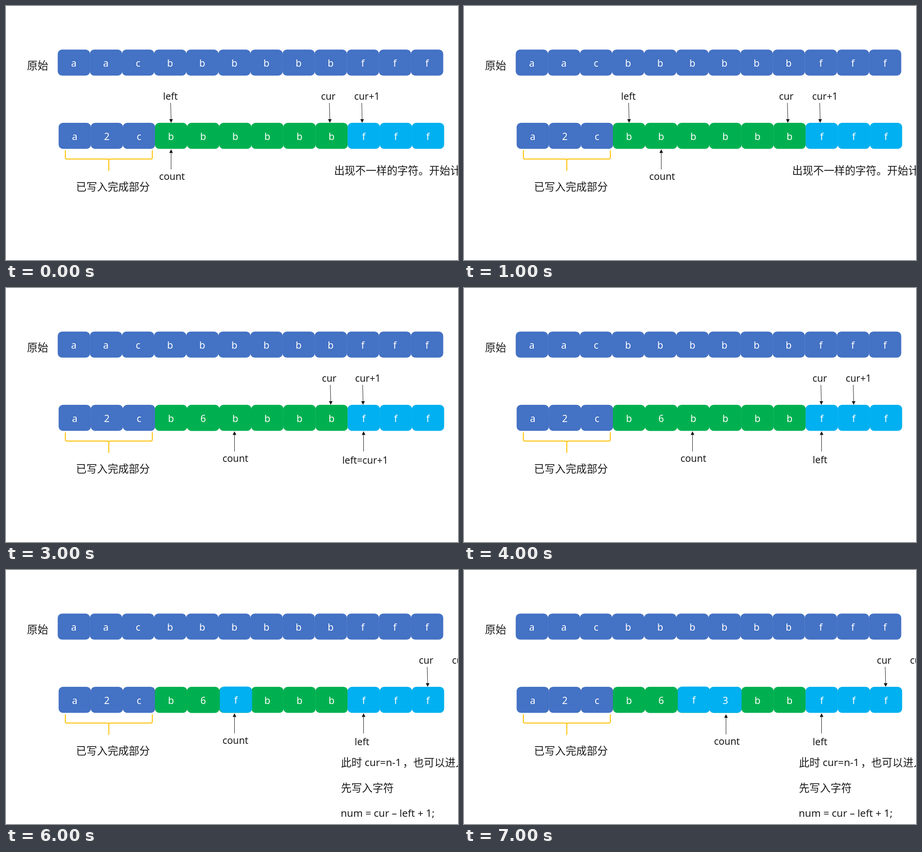
Recreate the animation shown at these times as an HTML page. Size 998 by 561 pixels, loop 8 s.

```html
<!DOCTYPE html>
<html lang="zh-CN">
<head>
<meta charset="utf-8">
<title>Run-length compression</title>
<style>
  html, body { margin: 0; width: 100%; height: 100%; overflow: hidden; background: #fff; }
  svg { display: block; width: 998px; height: 561px; }
  text { font: 21.3px "Noto Sans", "Noto Sans CJK SC", "Noto Sans CJK", sans-serif; fill: #1a1a1a; }
  .mid, .cell text { text-anchor: middle; }
  .zh { font: 23.3px "Noto Sans CJK SC", "Noto Sans CJK", sans-serif; }
  .note { font-size: 22.4px; }
  .cell text { fill: #fff; }
  .blue { fill: #4472c4; }
  .green { fill: #00b050; }
  .cyan { fill: #00b0f0; }
  .arrow line { stroke: #1a1a1a; stroke-width: 1; }
  .arrow path { fill: #111; }
  .brace { fill: none; stroke: #ffc000; stroke-width: 2; }

  .timed { animation: 8s step-end infinite; }
  .until3 { animation-name: until3; }
  .from2 { animation-name: from2; }
  .from3 { animation-name: from3; }
  .from4 { animation-name: from4; }
  .from6 { animation-name: from6; }
  .from7 { animation-name: from7; }
  .at3 { animation-name: at3; }
  .cursor { animation-name: cursor; }
  .count { animation-name: count; }

  @keyframes until3 { 0% { visibility: visible } 37.5%, 100% { visibility: hidden } }
  @keyframes from2 { 0% { visibility: hidden } 25%, 100% { visibility: visible } }
  @keyframes from3 { 0% { visibility: hidden } 37.5%, 100% { visibility: visible } }
  @keyframes from4 { 0% { visibility: hidden } 50%, 100% { visibility: visible } }
  @keyframes from6 { 0% { visibility: hidden } 75%, 100% { visibility: visible } }
  @keyframes from7 { 0% { visibility: hidden } 87.5%, 100% { visibility: visible } }
  @keyframes at3 { 0% { visibility: hidden } 37.5% { visibility: visible } 50%, 100% { visibility: hidden } }
  @keyframes cursor {
    0% { transform: translate(0, 0) }
    37.5% { transform: translate(2px, 0) }
    50% { transform: translate(74px, 0) }
    62.5% { transform: translate(146px, 0) }
    75%, 100% { transform: translate(216px, 0) }
  }
  @keyframes count {
    0% { transform: translate(0, 0) }
    12.5% { transform: translate(71px, 0) }
    25% { transform: translate(145.5px, -3px) }
    37.5% { transform: translate(140px, 0) }
    87.5%, 100% { transform: translate(214px, 2px) }
  }
</style>
</head>
<body>
<svg viewBox="0 0 998 561">
  <text class="zh" x="46.5" y="140">原始</text>
  <g id="cells"></g>

  <path class="brace" d="M131 319V335Q131 338 134 338H224Q227 338 227 341V364V341Q227 338 230 338H320Q323 338 323 335V319"/>
  <text class="zh" x="154.5" y="407.5">已写入完成部分</text>

  <g class="timed until3">
    <text class="mid" x="363" y="206.5">left</text>
    <g class="arrow" data-line="363.5 214 364.5 258"></g>
    <text class="zh" x="724.5" y="372">出现不一样的字符。开始计数</text>
  </g>

  <g class="timed cursor">
    <text class="mid" x="711.5" y="206.5">cur</text>
    <g class="arrow" data-line="714 214 715 258"></g>
    <text class="mid" x="797" y="206.5">cur+1</text>
    <g class="arrow" data-line="785.5 214 786.3 258"></g>
  </g>

  <g class="timed count">
    <g class="arrow" data-line="364.5 361 364.5 316.5"></g>
    <text class="mid" x="366.5" y="384">count</text>
  </g>

  <g class="timed from3">
    <g class="arrow" data-line="789.5 361 789.5 316.5"></g>
  </g>
  <text class="mid timed at3" x="793" y="387.5">left=cur+1</text>
  <text class="mid timed from4" x="786" y="386.5">left</text>

  <g class="timed from6">
    <text class="zh" x="739.5" y="434">此时</text>
    <text class="note" x="792" y="433">cur=n-1</text>
    <text class="zh" x="876" y="434">，也可以进入</text>
    <text class="zh" x="739.5" y="490">先写入字符</text>
    <text class="note" x="739" y="545">num = cur – left + 1;</text>
  </g>
</svg>
<script>
  const PITCH = 70.9;
  const cells = document.getElementById('cells');

  function cell(x, y, letter, color, timing = '') {
    return `<g class="cell ${timing}">
      <rect class="${color}" x="${x}" y="${y}" width="${PITCH + 0.4}" height="57.6" rx="9.6"/>
      <text x="${x + 35.5}" y="${y + 37.5}">${letter}</text></g>`;
  }

  const colorAt = i => i < 3 ? 'blue' : i < 9 ? 'green' : 'cyan';
  const lowerX = i => 116.2 + i * PITCH;
  let markup = '';
  [...'aacbbbbbbfff'].forEach((c, i) => markup += cell(114.2 + i * PITCH, 96.2, c, 'blue'));
  [...'a2cbbbbbbfff'].forEach((c, i) => markup += cell(lowerX(i), 258, c, colorAt(i)));
  markup += cell(lowerX(4), 258, '6', 'green', 'timed from2');
  markup += cell(lowerX(6), 258, '3', 'cyan', 'timed from7');
  markup += cell(lowerX(5) + 1.4, 257.6, 'f', 'cyan', 'timed from6');
  cells.innerHTML = markup;

  // Each arrow points from its first coordinate pair to its second.
  for (const arrow of document.querySelectorAll('.arrow')) {
    const [x1, y1, x2, y2] = arrow.dataset.line.split(' ').map(Number);
    const back = y2 - Math.sign(y2 - y1) * 8;
    arrow.innerHTML = `<line x1="${x1}" y1="${y1}" x2="${x2}" y2="${back}"/>
      <path d="M${x2} ${y2}L${x2 - 4} ${back}H${x2 + 4}Z"/>`;
  }
</script>
</body>
</html>
```
